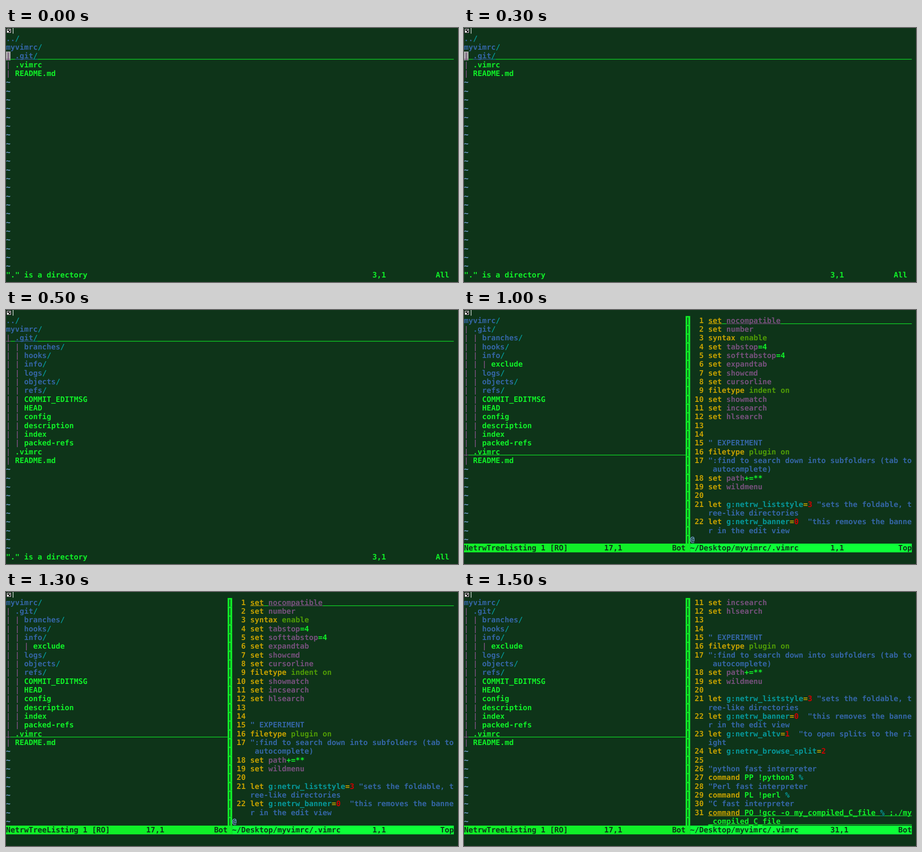
These frames come from a looping animation (998x561 px, 2000 ms). An HTML page:

```html
<!DOCTYPE html>
<html lang="en">
<head>
<meta charset="utf-8">
<title>Vim file tree</title>
<style>
  html, body { margin: 0; width: 100%; height: 100%; overflow: hidden; background: #0e3419; }
  svg { display: block; width: 998px; height: 561px; }
  text {
    font: bold 16.588px "DejaVu Sans Mono", monospace;
    white-space: pre;
    text-rendering: geometricPrecision;
  }
</style>
</head>
<body>
<svg viewBox="0 0 998 561" xmlns="http://www.w3.org/2000/svg">
  <rect width="998" height="561" fill="#0e3419"/>
  <g id="icon">
    <rect x="1" y="1" width="11" height="10.5" fill="#111"/>
    <rect x="2.5" y="2.5" width="8" height="7.5" fill="none" stroke="#fff"/>
    <path d="M3 6h3v3.5h-3zM7 4h2v2h-2z" fill="#fff"/>
    <rect x="15" width="1.2" height="12.5" fill="#fff"/>
  </g>
  <g id="screen"></g>
</svg>
<script>
const W = 9.987, H = 19.333, TOP = 13.3, ASCENT = 15.4;
const STEP = 500, COLS = 99, SPLIT = 49;

// Colour codes used after ^ in screen lines
const INK = {
  g: '#10f028', b: '#3465a4', c: '#06989a', p: '#75507b', y: '#c4a000',
  o: '#4e9a06', r: '#cc0000', t: '#729fcf', k: '#0e3419'
};
const BAR = '#10f028', BAR_ACTIVE = '#0dff38';

const rect = (x, y, w, h, fill) =>
  `<rect x="${x}" y="${y}" width="${w}" height="${h}" fill="${fill}"/>`;
const rowY = row => TOP + row * H;
const escapeText = s => s.replace(/&/g, '&amp;').replace(/</g, '&lt;');

function cells(row, col, count, fill) {
  return rect(col * W, rowY(row), count * W, H, fill);
}

// Draws a marked-up line; with `end` it is underlined up to that column.
function line(row, col, markup, end = 0) {
  let out = '';
  const rule = (from, to, ink) =>
    rect(from * W, rowY(row) + 16.5, (to - from) * W, 1.2, ink);
  for (const part of markup.split('^').slice(1)) {
    const ink = INK[part[0]], s = part.slice(1);
    if (s.trim()) {
      out += `<text x="${col * W}" y="${rowY(row) + ASCENT}" fill="${ink}">${escapeText(s)}</text>`;
    }
    if (end) out += rule(col, col + s.length, ink);
    col += s.length;
  }
  if (end) out += rule(col, end, INK.g);
  return out;
}

// File tree: a trailing slash marks a directory
function entry(depth, name) {
  const body = name.endsWith('/') ? `^b${name.slice(0, -1)}^c/` : `^g${name}`;
  return '^p|^g '.repeat(depth) + body;
}
const entries = (depth, names) => names.split(' ').map(n => entry(depth, n));

const root = entry(0, 'myvimrc/'), git = entry(1, '.git/');
const files = entries(1, '.vimrc README.md');
const gitFiles = entries(2, 'COMMIT_EDITMSG HEAD config description index packed-refs');
const closedTree = [entry(0, '../'), root, git, ...files];
const openTree = [entry(0, '../'), root, git,
  ...entries(2, 'branches/ hooks/ info/ logs/ objects/ refs/'), ...gitFiles, ...files];
const splitTree = [root, git, ...entries(2, 'branches/ hooks/ info/'), entry(3, 'exclude'),
  ...entries(2, 'logs/ objects/ refs/'), ...gitFiles, ...files];

// Edited file; an array holds a line and its wrapped remainder
const opt = (name, value = '') => `^yset^g ^p${name}^g${value}`;
const type = word => `^yfiletype^g ^o${word} on`;
const setting = (name, value, note) => `^ylet^g ^cg:netrw_${name}^y=^r${value}^b${note}`;
const command = (name, run, rest = '') => `^ycommand^g ${name} !${run} ^c%^g${rest}`;

const source = [
  opt('nocompatible'), opt('number'), '^ysyntax^g ^oenable',
  opt('tabstop', '=4'), opt('softtabstop', '=4'), opt('expandtab'),
  opt('showcmd'), opt('cursorline'), type('indent'),
  opt('showmatch'), opt('incsearch'), opt('hlsearch'), '', '',
  '^b" EXPERIMENT', type('plugin'),
  ['^b":find to search down into subfolders (tab to', '^b autocomplete)'],
  opt('path', '+=**'), opt('wildmenu'), '',
  [setting('liststyle', 3, ' "sets the foldable, t'), '^bree-like directories'],
  [setting('banner', 0, '  "this removes the banne'), '^br in the edit view'],
  [setting('altv', 1, '  "to open splits to the ri'), '^bight'],
  setting('browse_split', 2, ''), '',
  '^b"python fast interpreter', command('PP', 'python3'),
  '^b"Perl fast interpreter', command('PL', 'perl'),
  '^b"C fast interpreter',
  [command('PO', 'gcc -o my_compiled_C_file', ' ;./my'), '^g_compiled_C_file']
];
const rows = source.flatMap((item, i) =>
  [].concat(item).map((text, j) => ({ text, num: j ? '' : String(i + 1).padStart(3) })));

function tree(list, current, end, bottom) {
  let out = list.map((text, i) => line(i, 0, text, i === current ? end : 0)).join('');
  for (let i = list.length; i <= bottom; i++) out += line(i, 0, '^t~');
  return out;
}

function browser(list, cursor) {
  return (cursor ? cells(2, 0, 1, '#aaaaaa') : '') + tree(list, 2, COLS, 26 - 5 + 5 - 5 + 5)
    + line(27, 0, '^g"." is a directory') + line(27, 81, '^g3,1') + line(27, 95, '^gAll');
}

function editor(first, count, current, position, place) {
  let out = tree(splitTree, 15, SPLIT, 25);
  for (let i = 0; i < 26; i++) out += cells(i, SPLIT, 1, BAR) + line(i, SPLIT, '^k|');
  rows.slice(first, first + count).forEach(({ text, num }, i) => {
    if (num) out += line(i, 51, '^y' + num.slice(-3).trim().padStart(2));
    out += line(i, 54, text, current.includes(i) ? COLS : 0);
  });
  if (count < 26) out += line(25, 50, '^t@');
  out += cells(26, 0, 50, BAR) + cells(26, 50, 49, BAR_ACTIVE);
  const status = [[0, 'NetrwTreeListing 1 [RO]'], [31, '17,1'], [46, 'Bot'],
    [50, '~/Desktop/myvimrc/.vimrc'], [81, position], [96, place]];
  return out + status.map(([col, text]) => line(26, col, '^k' + text)).join('');
}

const scenes = [
  browser(closedTree, true),
  browser(openTree, false),
  editor(0, 25, [0], '1,1', 'Top'),
  editor(10, 26, [24, 25], '31,1', 'Bot')
];

const screenGroup = document.getElementById('screen');
const start = performance.now();
let shown = -1;

function render(now) {
  const index = Math.floor(Math.max(0, now - start) / STEP) % scenes.length;
  if (index !== shown) {
    screenGroup.innerHTML = scenes[index];
    shown = index;
  }
  requestAnimationFrame(render);
}
render(start);
</script>
</body>
</html>
```
